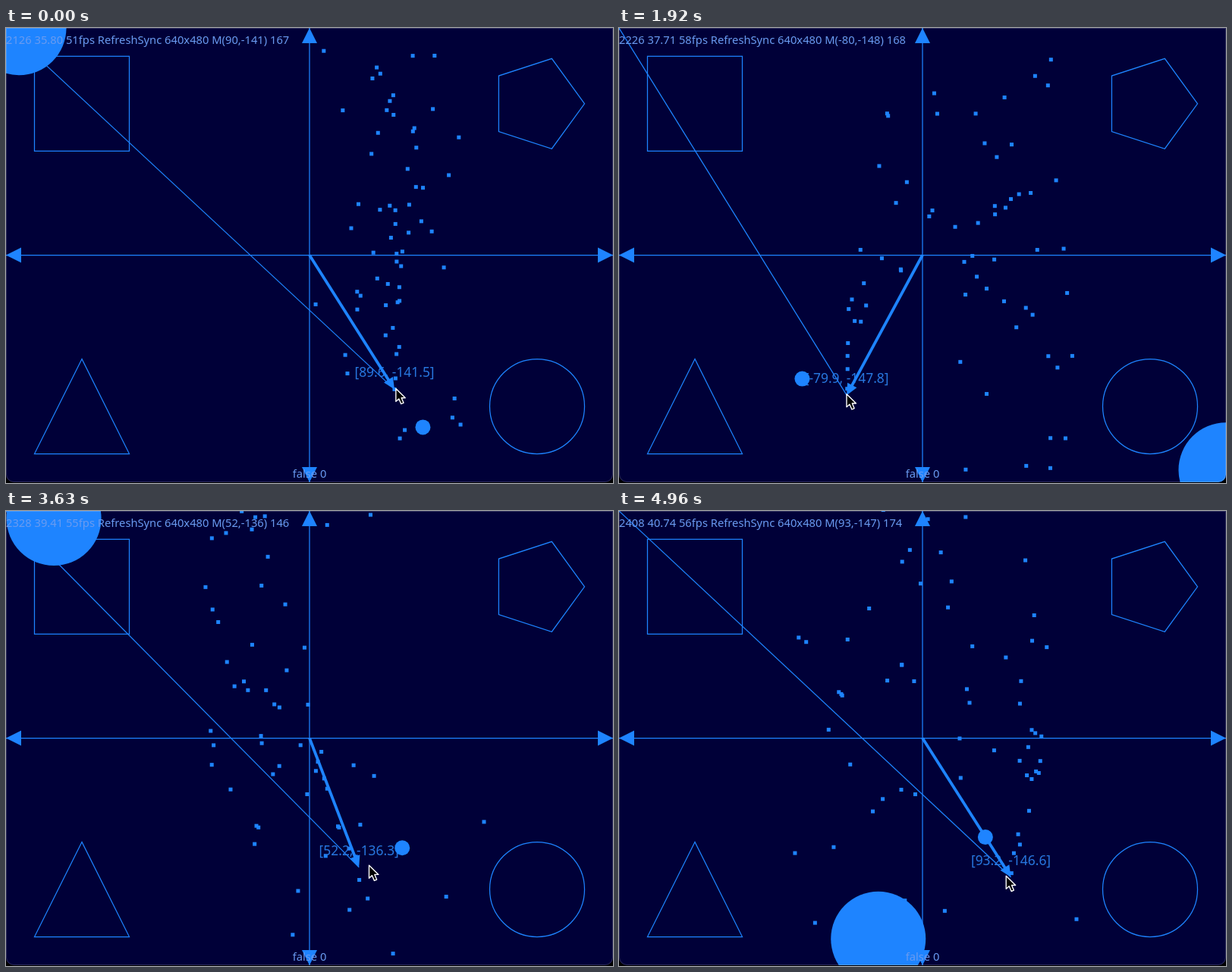
These frames come from a looping animation (800 by 600 pixels, 5000 ms). An HTML page with a canvas:

```html
<!DOCTYPE html>
<html lang="en">
<head>
<meta charset="utf-8">
<title>Vector playground</title>
<style>
  html, body { margin: 0; width: 100%; height: 100%; overflow: hidden; background: #000; }
  canvas { display: block; }
</style>
</head>
<body>
<canvas id="stage" width="800" height="600"></canvas>
<script>
const ctx = document.getElementById('stage').getContext('2d');
const BLUE = '#1e84ff', NIGHT = '#000038', STATUS = '#6a9bf0', LABEL = '#2878e0';
const TAU = Math.PI * 2;
const OX = 400, OY = 299.5, UNIT = 1.25;   // screen origin and scale of the 640x480 world
const R = 50 * UNIT;                       // radius shared by all the shapes
const RATE = 24, LAST = 119;               // picture steps per second, last step
const GRAVITY = 277, SPAWN = 20;           // px/s², particles per second

// pointer path: step, x, y, horizontal speed per second
const PATH = [
  [0, 89.6, -141.5, 0], [16, 70.5, -144.3, -250], [32, -48.3, -149.7, -114],
  [60, -78.3, -145.8, 0], [76, -3.5, -142.0, 75], [99, 111.0, -129.8, 63],
  [LAST, 93.2, -146.6, -75]
];

const random = n => {
  const v = Math.sin(n * 12.9898 + 4.1) * 43758.5453;
  return v - Math.floor(v);
};

function hermite(p, q, v, w, s) {
  const s2 = s * s, s3 = s2 * s;
  return p * (2 * s3 - 3 * s2 + 1) + q * (3 * s2 - 2 * s3) + v * (s3 - 2 * s2 + s) + w * (s3 - s2);
}

function pointerAt(step) {
  let i = 0;
  while (i < PATH.length - 2 && step >= PATH[i + 1][0]) i++;
  const [k0, x0, y0, v0] = PATH[i], [k1, x1, y1, v1] = PATH[i + 1];
  const s = Math.max(0, (step - k0) / (k1 - k0)), span = (k1 - k0) / RATE;
  const x = hermite(x0, x1, v0 * span, v1 * span, s);
  const y = hermite(y0, y1, 0, 0, s);
  return { x, y, px: OX + x * UNIT, py: OY - y * UNIT };
}

const clockAt = step => 35.8 + step * 0.04154;

// the counter speeds up to a steady 60 per second
function counterAt(step) {
  const slow = Math.min(step, 32);
  return Math.floor(2126 + 1.844 * slow + 0.0059 * slow * slow + 2.5 * (step - slow));
}

function disc(x, y, r) {
  ctx.beginPath();
  ctx.arc(x, y, r, 0, TAU);
}

function poly(points) {
  ctx.beginPath();
  points.forEach(([x, y]) => ctx.lineTo(x, y));
  ctx.closePath();
}

function line(x1, y1, x2, y2, width) {
  ctx.lineWidth = width;
  ctx.beginPath();
  ctx.moveTo(x1, y1);
  ctx.lineTo(x2, y2);
  ctx.stroke();
}

function arrowHead(x, y, angle, length, half) {
  ctx.save();
  ctx.translate(x, y);
  ctx.rotate(angle);
  poly([[0, 0], [-length, -half], [-length, half]]);
  ctx.fill();
  ctx.restore();
}

function text(str, x, y, size, color, align) {
  ctx.font = size + 'px "Noto Sans", "Open Sans", sans-serif';
  ctx.textAlign = align;
  ctx.fillStyle = color;
  ctx.fillText(str, x, y);
}

function drawScene() {
  line(0, OY, 800, OY, UNIT);
  line(OX, 0, OX, 599, UNIT);
  [[800, OY], [OX, 599], [0, OY], [OX, 0]].forEach(([x, y], i) => arrowHead(x, y, i * TAU / 4, 20, 10));

  ctx.strokeRect(100 - R, 99.8 - R, 2 * R, 2 * R);
  poly([0, 1, 2, 3, 4].map(i => [700 + R * Math.cos(i * TAU / 5), 99.8 - R * Math.sin(i * TAU / 5)]));
  ctx.stroke();
  poly([[100, 499 - R], [100 - R, 499 + R], [100 + R, 499 + R]]);
  ctx.stroke();
  disc(700, 499, R);
  ctx.stroke();
}

function drawFountain(time) {
  const newest = Math.floor(time * SPAWN);
  for (let i = newest - 98; i <= newest; i++) {
    const born = i / SPAWN, age = time - born;
    const from = pointerAt(born * RATE);
    const x = from.px + (random(i) - 0.5) * 64 * age;
    const speed = 270 + 350 * random(i + 500);
    const y = from.py - speed * age + GRAVITY * age * age / 2;
    ctx.fillRect(x - 2.5, y - 2.5, 5, 5);
  }
}

function drawCursor(x, y) {
  ctx.save();
  ctx.translate(x, y);
  ctx.scale(0.92, 0.92);
  poly([[0, 0], [0, 18.5], [4.3, 14.6], [7.5, 22], [11, 20.5], [8, 13.3], [13.5, 13.3]]);
  ctx.fillStyle = '#000';
  ctx.strokeStyle = '#fff';
  ctx.lineWidth = 1.5;
  ctx.lineJoin = 'round';
  ctx.fill();
  ctx.stroke();
  ctx.restore();
}

function draw(step) {
  const { x, y, px, py } = pointerAt(step);
  const clock = clockAt(step), counter = counterAt(step);
  ctx.fillStyle = '#000';
  ctx.fillRect(0, 0, 800, 600);
  ctx.save();
  ctx.beginPath();
  ctx.roundRect(0, 0, 800, 599, [0, 0, 10, 10]);
  ctx.clip();
  ctx.fillStyle = NIGHT;
  ctx.fillRect(0, 0, 800, 600);

  ctx.fillStyle = ctx.strokeStyle = BLUE;
  drawScene();
  line(0, 0, px, py, UNIT);
  drawFountain(step / RATE);

  text(`[${x.toFixed(1)}, ${y.toFixed(1)}]`, px, py - 16, 17.4, LABEL, 'center');

  ctx.fillStyle = BLUE;
  const angle = Math.atan2(py - OY, px - OX);
  line(OX, OY, px - 10 * Math.cos(angle), py - 10 * Math.sin(angle), 3 * UNIT);
  arrowHead(px, py, angle, 15, 7);

  const turn = (counter + 1) * 0.1;
  disc(px + R * Math.cos(turn), py - R * Math.sin(turn), 10);
  ctx.fill();
  disc(OX + 400 * Math.cos(1.5 * clock), OY - 300 * Math.sin(1.8 * clock), R);
  ctx.fill();

  const fps = 46 + Math.floor(random(step) * 14);
  const status = `${counter} ${clock.toFixed(2)} ${fps}fps RefreshSync 640x480 ` +
    `M(${Math.round(x)},${Math.round(y)}) ${Math.round(Math.hypot(x, y))}`;
  text(status, 0, 21, 14.72, STATUS, 'left');
  text('false 0', 400, 592.5, 14.72, STATUS, 'center');
  ctx.restore();

  ctx.strokeStyle = 'rgba(255,255,255,.18)';
  ctx.lineWidth = 1;
  ctx.beginPath();
  ctx.roundRect(0.5, 0.5, 799, 598, [0, 0, 10, 10]);
  ctx.stroke();

  const lead = pointerAt(step + 1.7);   // the system cursor runs ahead of the drawing
  drawCursor(lead.px + 0.5, lead.py - 1);
}

function tick(now) {
  let step = Math.floor((now % 5000) * RATE / 1000 + 0.1);
  if (step > 2 && step < 12) step = 2;   // short stall near the start
  draw(Math.min(step, LAST));
  requestAnimationFrame(tick);
}
requestAnimationFrame(tick);
</script>
</body>
</html>
```
